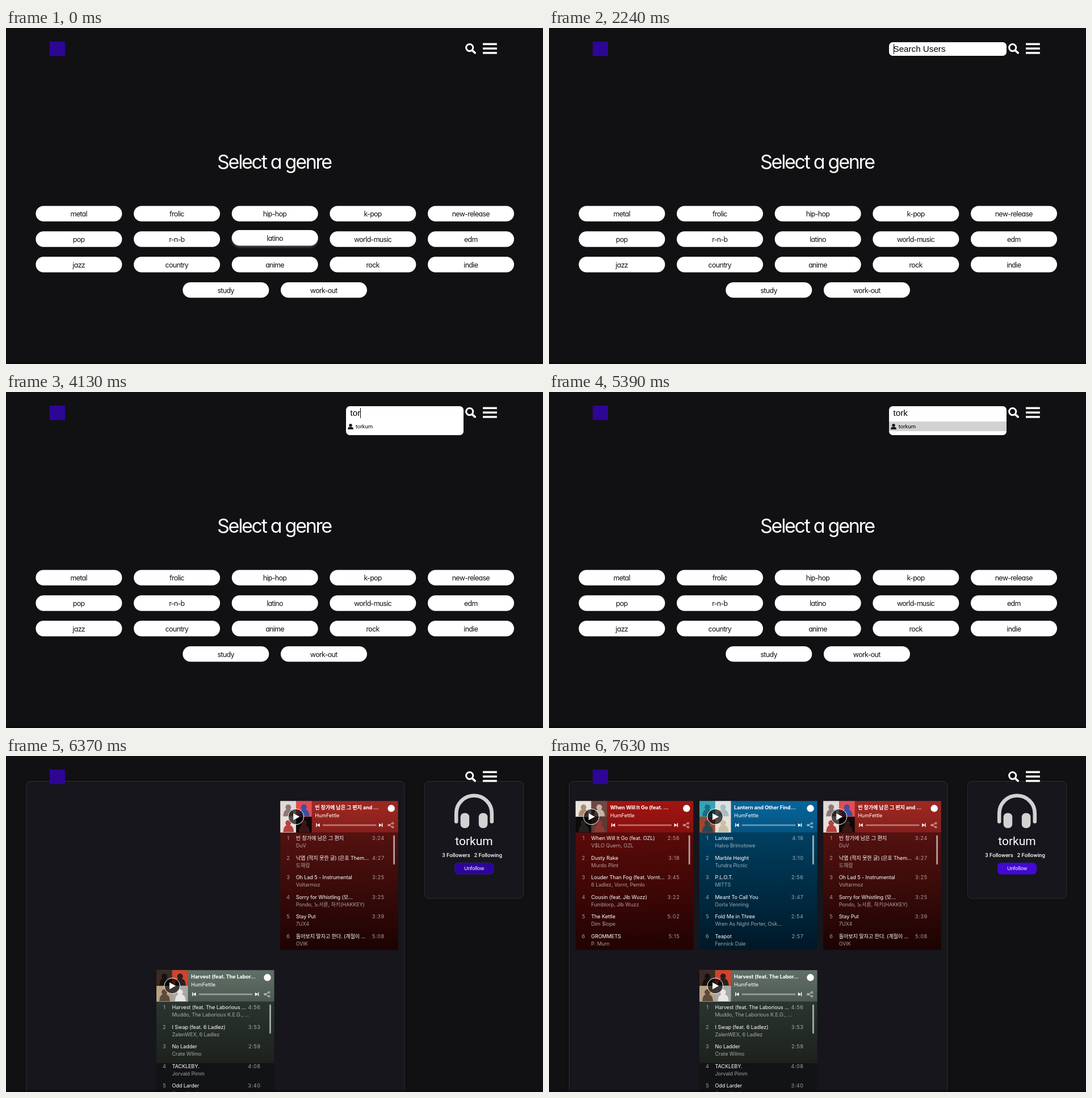
These frames come from a looping animation (946x592 px, 8 s). An HTML page:

```html
<!DOCTYPE html>
<html lang="en">
<head>
<meta charset="utf-8">
<title>Genre picker</title>
<style>
  html, body { margin: 0; width: 100%; height: 100%; overflow: hidden; background: #111113; }
  svg { display: block; width: 946px; height: 592px; }
  text { white-space: pre; }
  .page { font-family: Inter, sans-serif; font-feature-settings: "cv11"; text-anchor: middle; }
  .title { font-size: 34px; letter-spacing: -2.3px; fill: #fff; }
  .pill { font-size: 12.4px; letter-spacing: -.65px; fill: #111; }
  .field { font: 15.2px "Liberation Sans", Arial, sans-serif; }
  .small { font: 9.6px Roboto, sans-serif; }
  .player { font: 9.1px Inter, "Noto Sans CJK KR", "Noto Sans CJK", sans-serif; letter-spacing: -.1px; fill: #fff; }
  .player .dim { fill: #fff; opacity: .6; }
  .player .bold { font-weight: 700; }
  .player .time { letter-spacing: .6px; }
  .mid { text-anchor: middle; }
  .end { text-anchor: end; }
</style>
</head>
<body>
<svg id="stage" viewBox="0 0 946 592"></svg>
<script>
const LOOP = 8000;
const USER = "torkum", MAKER = "HumFettle";

const rect = (x, y, w, h, fill, r = 0, more = "") =>
  `<rect x="${x}" y="${y}" width="${w}" height="${h}" rx="${r}" fill="${fill}" ${more}/>`;
const circle = (x, y, r, fill, more = "") => `<circle cx="${x}" cy="${y}" r="${r}" fill="${fill}" ${more}/>`;
const path = (d, more) => `<path d="${d}" ${more}/>`;
const text = (x, y, s, cls = "", more = "") => `<text x="${x}" y="${y}" class="${cls}" ${more}>${s}</text>`;
const group = (x, y, body) => `<g transform="translate(${x} ${y})">${body}</g>`;
// Content visible only from one time to another
const during = (from, to, body) => `<g data-from="${from}" data-to="${to}">${body}</g>`;
const gradient = (id, top, bottom) =>
  `<linearGradient id="${id}" x2="0" y2="1"><stop stop-color="${top}"/><stop offset="1" stop-color="${bottom}"/></linearGradient>`;

function pill(name, x, y) {
  return rect(x, y, 152, 27.4, "#fff", 13.7) + text(x + 75.8, y + 18.6, name, "pill");
}

function genrePage() {
  const rows = [
    ["metal", "frolic", "hip-hop", "k-pop", "new-release"],
    ["pop", "r-n-b", "latino", "world-music", "edm"],
    ["jazz", "country", "anime", "rock", "indie"],
    ["study", "work-out"],
  ];
  const pills = rows.map((row, r) => row.map((name, c) => {
    const x = (row.length === 5 ? 52.4 : 311.3) + c * 172.65, y = 313.4 + r * 44.85;
    if (name !== "latino") return pill(name, x, y);
    return during(0, 630, `<g filter="url(#glow)">${pill(name, x, y - 2.2)}</g>`) + during(630, LOOP, pill(name, x, y));
  }).join("")).join("");
  return `<g class="page">${text(472.5, 247.5, "Select a genre", "title")}${pills}</g>`;
}

function header() {
  const bars = [26.6, 34.4, 42.2].map(y => rect(840, y, 24.8, 3.5, "#fff")).join("");
  return rect(77, 24, 27, 25.5, "#2d0696") + bars +
    circle(816.7, 34.6, 6.1, "none", 'stroke="#fff" stroke-width="3"') +
    path("M821.6 39.6l4.6 4.2", 'stroke="#fff" stroke-width="3.8" stroke-linecap="round"');
}

function userRow(y, name) {
  return circle(607, y + 6.8, 2.7, "#111") +
    path(`M602.2 ${y + 13.8}v-1.2q0-2.9 2.9-2.9h3.8q2.9 0 2.9 2.9v1.2z`, 'fill="#111"') +
    text(615.8, y + 12.2, name, "small");
}

function searchBox() {
  const box = (from, to, bottom) => during(from, to, rect(599, 25, 207, bottom - 25, "#fff", 6.5));
  const typed = (from, to, s) => during(from, to, text(606.5, 42, s, "field"));
  const caret = (from, to, x) => during(from, to, rect(x, 28, 1, 18, "#000"));
  return box(2240, 3780, 49) + box(3780, 3990, 93) + box(3990, 6020, 76) +
    during(5180, 5810, rect(599, 52, 207, 17, "#d2d2d2")) +
    typed(2240, 3290, "Search Users") + typed(3290, 3780, USER.slice(0, 1)) + typed(3780, 3990, USER.slice(0, 2)) +
    typed(3990, 4830, USER.slice(0, 3)) + typed(4830, 6020, USER.slice(0, 4)) +
    caret(2240, 2730, 607) + caret(3290, 3780, 611) + caret(3780, 3990, 619) +
    caret(3990, 4690, 624) + caret(4830, 5390, 632) +
    during(3780, 6020, userRow(52, USER)) + during(3780, 3990, userRow(69, "tozzup"));
}

function profile() {
  const panel = (x, w, h) => rect(x, 44.5, w, h, "#18181c", 7, 'stroke="#2d2d33" filter="url(#shade)"');
  const button = (from, to, fill, edge) =>
    during(from, to, rect(790.5, 188.3, 68.5, 20, fill, 6.5, `stroke="${edge}" stroke-width=".7"`));
  return panel(35.5, 666.5, 580) + panel(737.3, 174.5, 206.5) +
    path("M793.2 115.5V101a31.3 31.3 0 0 1 62.6 0V115.5",
      'fill="none" stroke="#d2d2d2" stroke-width="6.6" stroke-linecap="round"') +
    rect(800.6, 100.5, 15.6, 26.5, "#d2d2d2", 7) + rect(832.8, 100.5, 15.6, 26.5, "#d2d2d2", 7) +
    `<g fill="#fff">` + text(824.5, 157, USER, "small mid", 'style="font-size:21px"') +
    text(768.2, 177.5, "3 Followers", "small", 'style="font-weight:500"') +
    text(824.7, 177.5, "2 Following", "small", 'style="font-weight:500"') +
    button(0, 7630, "#2d049b", "#3a2385") + button(7630, LOOP, "#4109d3", "#4109d3") +
    text(824.5, 201, "Unfollow", "field mid", 'style="font-size:9.2px"') + "</g>";
}

// Four flat covers, each a ground colour with one simple shape
function covers(colors) {
  return colors.map(([ground, mark], i) => {
    const x = i % 2 * 27.7, y = (i >> 1) * 27.7;
    return rect(x, y, 27.8, 27.8, ground) +
      path(`M${x + 5} ${y + 27}q1-11 6-12a5 5 0 1 1 6 0q6 1 7 12z`, `fill="${mark}"`);
  }).join("");
}

function player({ id, x, y, painted = 262, head, body, art, title, tracks }) {
  const skip = (cx, dir) => group(cx, 42.5, `<g transform="scale(${dir} 1)">` +
    path("M-3-3.2L2 0L-3 3.2zM2-3.2h1.5v6.4H2z", 'fill="#fff"') + "</g>");
  const share = `<g stroke="#fff" stroke-width=".8" fill="none">` +
    path("M197 39.5l-5.2 3l5.2 3.2", "") +
    [[198.2, 39.2], [191, 42.5], [198.2, 46]].map(([cx, cy]) => circle(cx, cy, 1.5, "none")).join("") + "</g>";
  const rows = tracks.map(([song, artist, time], i) => group(0, 69 + i * 34.5,
    text(13.8, 0, i + 1, "dim mid") + text(27.5, 0, song) +
    text(27.5, 13.2, artist, "dim") + text(183.5, 0, time, "dim end time"))).join("");
  return `<defs>${gradient(id + "H", ...head)}${gradient(id + "B", ...body)}</defs>` +
    `<g class="player">` + group(x, y, rect(0, 55, 207.5, 207, "#121314") +
    rect(0, 55, 207.5, painted - 55, `url(#${id}B)`) +
    rect(0, 0, 207.5, 55.3, `url(#${id}H)`) + covers(art) +
    circle(27.7, 27.7, 13.8, "#000a", 'stroke="#fff" stroke-width="1"') +
    path("M23 21.8L34 27.7L23 33.6z", 'fill="#fff"') +
    text(61, 15, title, "bold") + text(61, 28.3, MAKER) + circle(195.5, 13, 6.2, "#fff") +
    skip(66.5, -1) + rect(74.5, 41.3, 95, 2.6, "#fff6", 1.3) + skip(176.8, 1) + share +
    rows + rect(199, 60.5, 2.8, 51.5, "#fff9", 1.4)) + "</g>";
}

const players = [
  { id: "ruby", from: 6440, x: 46.8, y: 79.3, head: ["#a31512", "#86100e"], body: ["#5a0b09", "#210302"],
    art: [["#e8e4df", "#b08a6c"], ["#6e4a42", "#c8b3a4"], ["#0c0a0a", "#252020"], ["#5d3a35", "#8b3a34"]],
    title: "When Will It Go (feat. …",
    tracks: [["When Will It Go (feat. OZL)", "V$LO Quern, OZL", "2:56"], ["Dusty Rake", "Murdo Plint", "3:18"],
      ["Louder Than Fog (feat. Vornt…", "6 Ladlez, Vornt, Pemlo", "3:45"], ["Cousin (feat. Jib Wuzz)", "Fumblorp, Jib Wuzz", "3:22"],
      ["The Kettle", "Dim $lope", "5:02"], ["GROMMETS", "P. Murn", "5:15"]] },
  { id: "sea", from: 6510, x: 265, y: 79.3, head: ["#06659c", "#055481"], body: ["#003f61", "#001827"],
    art: [["#35a5b5", "#176f86"], ["#dce1e2", "#a9bcc2"], ["#a0452c", "#2b4650"], ["#e7e2d3", "#c9bfa8"]],
    title: "Lantern and Other Find…",
    tracks: [["Lantern", "Halvo Brimstowe", "4:16"], ["Marble Height", "Tundra Picnic", "3:10"],
      ["P.L.O.T.", "MITTS", "2:56"], ["Meant To Call You", "Dorla Venning", "3:47"],
      ["Fold Me in Three", "Wren As Night Porter, Osk…", "2:54"], ["Teapot", "Fennick Dale", "2:57"]] },
  { id: "brick", from: 6300, x: 483.2, y: 79.3, head: ["#a02823", "#841f1b"], body: ["#541210", "#1c0302"],
    art: [["#dedbd8", "#8d7777"], ["#e34c55", "#3e4fa0"], ["#e6dfdc", "#b5423f"], ["#0d0909", "#3a1715"]],
    title: "빈 창가에 남은 그 편지 and …",
    tracks: [["빈 창가에 남은 그 편지", "DuV", "3:24"], ["낙엽 (적지 못한 글) (은호 Them…", "도해람", "4:27"],
      ["Oh Lad 5 - Instrumental", "Voltarmoz", "3:25"], ["Sorry for Whistling (모…", "Pondo, 노서륜, 하키(HAKKEY)", "3:25"],
      ["Stay Put", "7UX4", "3:39"], ["돌아보지 말자고 한다. (계절이 …", "OVIK", "5:08"]] },
  { id: "moss", from: 6230, x: 265, y: 377.3, painted: 164, head: ["#617067", "#4d5a51"], body: ["#2b352f", "#1c211e"],
    art: [["#3b2a24", "#15100e"], ["#d0432b", "#27201e"], ["#b9a184", "#5c4a3b"], ["#a7a9a8", "#e9e6e3"]],
    title: "Harvest (feat. The Labor…",
    tracks: [["Harvest (feat. The Laborious …", "Muddo, The Laborious K.E.G., …", "4:56"], ["I Swap (feat. 6 Ladlez)", "ZalenWEX, 6 Ladlez", "3:53"],
      ["No Ladder", "Crate Wilmo", "2:59"], ["TACKLEBY.", "Jorvald Pimm", "4:08"], ["Odd Larder", "Gravel Lads", "3:40"]] },
];

const stage = document.getElementById("stage");
stage.innerHTML = `<defs>
    <filter id="glow" x="-10%" y="-30%" width="120%" height="180%"><feDropShadow dx="0" dy="3" stdDeviation="1.5" flood-color="#fff" flood-opacity=".2"/></filter>
    <filter id="shade" x="-10%" y="-10%" width="120%" height="120%"><feDropShadow dx="0" dy="0" stdDeviation="4" flood-color="#000" flood-opacity=".35"/></filter>
  </defs>` +
  rect(0, 0, 946, 592, "#111113") +
  during(0, 5670, genrePage()) +
  during(5670, LOOP, profile()) +
  players.map(p => during(p.from, LOOP, player(p))).join("") +
  header() + searchBox() + rect(0, 588.5, 946, 3.5, "#0b050c", 0, 'opacity=".6"');

const timed = [...stage.querySelectorAll("[data-from]")].map(el => ({ el, from: +el.dataset.from, to: +el.dataset.to }));
const start = performance.now();

function draw() {
  const t = (performance.now() - start) % LOOP;
  for (const { el, from, to } of timed) el.style.display = t >= from && t < to ? "" : "none";
  requestAnimationFrame(draw);
}
draw();
</script>
</body>
</html>
```
